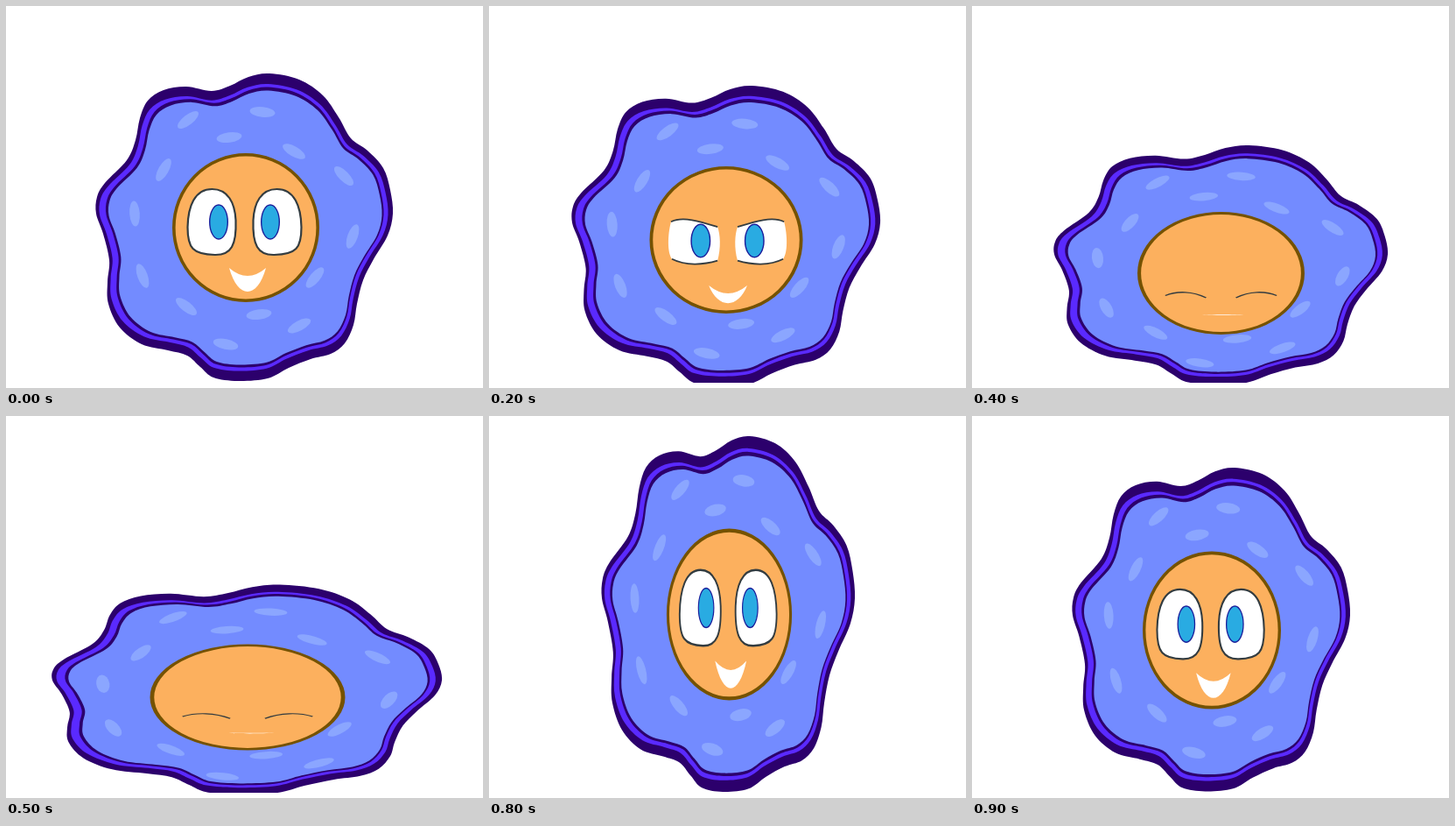
Recreate the animation shown at these times as an HTML page with a canvas. Size 545 by 436 pixels, loop 1 s.

```html
<!DOCTYPE html>
<html lang="en">
<head>
<meta charset="utf-8">
<style>
html, body { margin: 0; width: 100%; height: 100%; overflow: hidden; background: #fff; }
canvas { display: block; }
</style>
</head>
<body>
<canvas id="stage" width="545" height="436"></canvas>
<script>
const ctx = document.getElementById('stage').getContext('2d');
const LOOP = 1000, FLOOR = 430;

// Boxes are [left, top, right, bottom]; all parts are drawn in the rest pose.
const REST = [103, 77, 442, 428];
const FACE = { x: 274, y: 253, rx: 84, ry: 85 };

const OUTLINE = [
  301,77, 335,84, 362,102, 380,127, 394,151, 413,165, 431,185, 439,210, 442,237,
  436,262, 420,289, 408,313, 401,340, 397,364, 387,385, 371,397, 348,403, 323,413,
  299,425, 265,428, 237,424, 222,412, 207,399, 185,393, 155,386, 130,367, 117,340,
  116,315, 118,290, 111,260, 103,237, 104,218, 113,202, 138,176, 148,153, 153,128,
  162,108, 180,96, 206,92, 235,97, 256,91, 277,81
];

const LAYERS = [
  ['#2c006c', REST],
  ['#5a2aff', [107, 89, 436.5, 416.5]],
  ['#2c006c', [114.5, 92.5, 431.5, 412.5]],
  ['#738bff', [117.5, 96.5, 429.5, 409.5]]
];

// x, y, angle in degrees
const SPRINKLES = [
  [208, 130, -38], [293, 121, 6], [255, 150, -8], [329, 166, 30], [386, 194, 45],
  [180, 187, -60], [147, 237, 86], [156, 308, 70], [206, 343, 38], [289, 352, -8],
  [251, 386, 12], [335, 365, -28], [353, 310, -50], [396, 263, -70]
];

const WIDE = new Path2D('M0-37.5C-20-37.5-27.5-18-28 6C-28 30-22 37 3 37.5C22 38 28 26 27-2C26-22 18-37.5 0-37.5Z');
const SQUINT = new Path2D('M26-16C8-22-12-29-25-22C-29-6-29 14-24 21C-9 29 10 28 26 23C30 8 29-8 26-16Z');
const LIDS = new Path2D('M26-16C8-22-12-29-25-22M-24 21C-9 29 10 28 26 23');
const CLOSED = new Path2D('M-56 31C-44 24-28 25-15 34');

// drop: extra stretch of the sprinkles; eye: [kind, y, height]; mouth: [corners, dip, bottom]
const wide = ['wide', -6.5, 1], grin = [46, 55, 73];
const shut = ['closed', 0, 1], line = [57, 57.4, 58.2];
const POSES = [
  { at: 0, box: REST, drop: 0, face: [274, 253, 84, 85], eye: wide, mouth: grin },
  { at: 200, box: [95, 91, 447, 434], drop: 4, face: [271, 267, 87.5, 84], eye: ['squint', 1, 1], mouth: [52.6, 61.7, 73] },
  { at: 300, box: [95, 125, 461, 434], drop: 6, face: [278, 286, 91.5, 77], eye: ['squint', 17, .5], mouth: [55, 59.5, 65] },
  { at: 400, box: [94, 159, 475, 432], drop: 9, face: [284.5, 305, 95.5, 70], eye: shut, mouth: line },
  { at: 500, box: [53, 192.5, 498, 432], drop: 9, face: [276, 321, 111.5, 60.5], eye: shut, mouth: line },
  { at: 700, box: [111, 77, 438, 434], drop: 12, face: [274.5, 270, 82, 89.5], eye: ['squint', 14, .83], mouth: [55, 60, 64.6] },
  { at: 800, box: [129, 23, 418, 429], drop: 0, face: [274.5, 226.5, 71.6, 98], eye: wide, mouth: grin },
  { at: 900, box: [115, 59, 432, 428.5], drop: 0, face: [274, 244.5, 79, 90], eye: wide, mouth: grin }
];

// Smooth closed curve through a flat list of points
function smooth(list) {
  const n = list.length / 2, path = new Path2D();
  const p = i => { const k = (i + n) % n * 2; return [list[k], list[k + 1]]; };
  path.moveTo(...p(0));
  for (let i = 0; i < n; i++) {
    const [a, b, c, d] = [p(i - 1), p(i), p(i + 1), p(i + 2)];
    path.bezierCurveTo(b[0] + (c[0] - a[0]) / 6, b[1] + (c[1] - a[1]) / 6,
      c[0] - (d[0] - b[0]) / 6, c[1] - (d[1] - b[1]) / 6, c[0], c[1]);
  }
  path.closePath();
  return path;
}
const blob = smooth(OUTLINE);

function scoped(draw) {
  ctx.save();
  draw();
  ctx.restore();
}

// Map the rest box onto another box
function fit([l, t, r, b]) {
  const sx = (r - l) / (REST[2] - REST[0]), sy = (b - t) / (REST[3] - REST[1]);
  ctx.transform(sx, 0, 0, sy, l - REST[0] * sx, t - REST[1] * sy);
}

function ellipse(x, y, rx, ry, angle = 0) {
  ctx.beginPath();
  ctx.ellipse(x, y, rx, ry, angle, 0, 2 * Math.PI);
}

function drawBody({ box, drop }) {
  scoped(() => {
    fit(box);
    for (const [color, layer] of LAYERS) scoped(() => {
      fit(layer);
      ctx.fillStyle = color;
      ctx.fill(blob);
    });
  });
  scoped(() => {
    fit([box[0], box[1], box[2], box[3] + drop]);
    ctx.fillStyle = '#8ba6ff';
    for (const [x, y, angle] of SPRINKLES) {
      ellipse(x, y, 14.5, 5.8, angle * Math.PI / 180);
      ctx.fill();
    }
  });
}

function drawEye(side, [kind, y, height]) {
  ctx.strokeStyle = '#333c40';
  if (kind === 'closed') {
    ctx.scale(side, 1);
    ctx.lineWidth = 1.6;
    ctx.stroke(CLOSED);
    return;
  }
  const isWide = kind === 'wide', shift = isWide ? -1.5 : 1.5;
  const shape = isWide ? WIDE : SQUINT;
  ctx.translate(side * 37 + shift, y);
  ctx.scale(-side, height);
  ctx.fillStyle = '#fff';
  ctx.fill(shape);
  scoped(() => {
    ctx.clip(shape);
    ellipse(7.5, 0, 10.3, (isWide ? 19.5 : Math.max(19, 19 * height)) / (isWide ? 1 : Math.max(height, .8)));
    ctx.fillStyle = '#29abe2';
    ctx.fill();
    ctx.strokeStyle = '#1b1f9c';
    ctx.lineWidth = 1.4;
    ctx.stroke();
  });
  ctx.lineWidth = isWide ? 2.2 : 1.8;
  ctx.stroke(isWide ? WIDE : LIDS);
}

function drawMouth([top, dip, bottom]) {
  const low = top + (bottom - top) * 4 / 3;
  ctx.beginPath();
  ctx.moveTo(-19, top);
  ctx.quadraticCurveTo(2, 2 * dip - top, 23, top);
  ctx.bezierCurveTo(13, low, -9, low, -19, top);
  ctx.fillStyle = '#fff';
  ctx.fill();
}

function drawFace({ face: [x, y, rx, ry], eye, mouth }) {
  scoped(() => {
    ctx.translate(x, y);
    ctx.scale(rx / FACE.rx, ry / FACE.ry);
    ellipse(0, 0, FACE.rx - 1.8, FACE.ry - 1.8);
    ctx.fillStyle = '#fcb05e';
    ctx.fill();
    ctx.strokeStyle = '#755200';
    ctx.lineWidth = 3.6;
    ctx.stroke();
    for (const side of [-1, 1]) scoped(() => drawEye(eye[0] === 'closed' ? -side : side, eye));
    drawMouth(mouth);
  });
}

function render(now) {
  const t = now % LOOP;
  const pose = POSES.filter(p => p.at <= t).pop() || POSES[0];
  ctx.fillStyle = '#fff';
  ctx.fillRect(0, 0, 545, 436);
  scoped(() => {
    ctx.beginPath();
    ctx.rect(0, 0, 545, FLOOR);
    ctx.clip();
    drawBody(pose);
    drawFace(pose);
  });
  requestAnimationFrame(() => render(performance.now()));
}
render(0);
</script>
</body>
</html>
```
